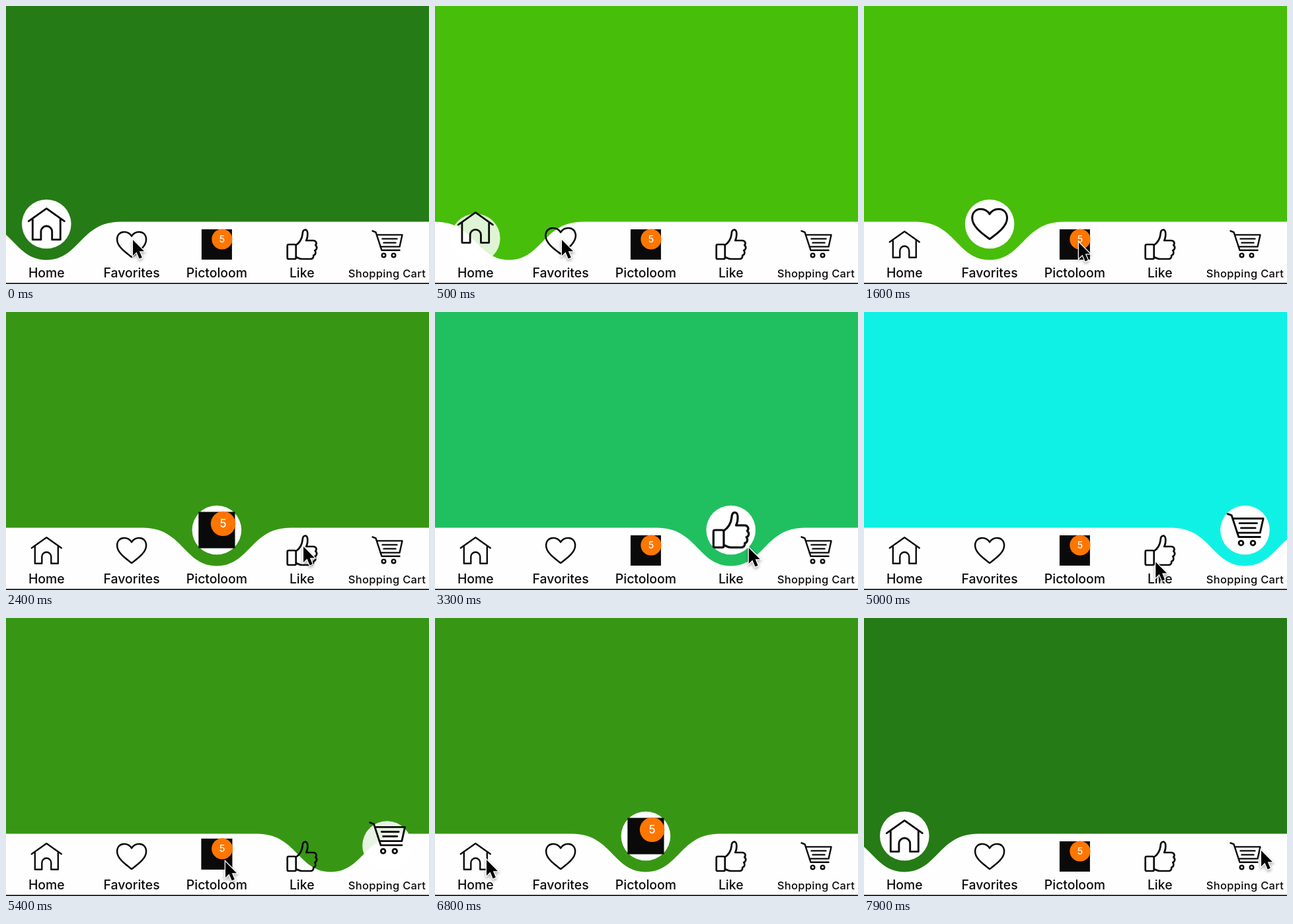
These frames come from a looping animation (640 by 422 pixels, 8000 ms). An HTML page with a canvas:

```html
<!DOCTYPE html>
<html lang="en">
<head>
<meta charset="utf-8">
<title>Curved tab bar</title>
<style>
html, body { margin: 0; width: 100%; height: 100%; overflow: hidden; }
canvas { display: block; width: 640px; height: 422px; }
</style>
</head>
<body>
<canvas id="stage"></canvas>
<script>
const W = 640, H = 422, LOOP = 8000;
const BAR_Y = 327.5, DENT_Y = 385.4, REST_Y = 362, RAISED_Y = 331, INK = '#0a0a0a';
const canvas = document.getElementById('stage');
const ctx = canvas.getContext('2d');
const ratio = window.devicePixelRatio || 1;
canvas.width = W * ratio;
canvas.height = H * ratio;

const tabs = [
  { label: 'Home', color: '#257b15', icon: drawHome },
  { label: 'Favorites', color: '#47be09', icon: drawHeart },
  { label: 'Pictoloom', color: '#379714', icon: drawPictures },
  { label: 'Like', color: '#20c060', icon: drawThumb },
  { label: 'Shopping Cart', color: '#10f1e6', icon: drawCart, size: 16.5, spacing: '0.3px' }
];
tabs.forEach((tab, i) => tab.x = 61.3 + 128.8 * i);

// [time, tab index]
const clicks = [[-1000, 0], [400, 1], [1630, 2], [2860, 3], [4086, 4], [5318, 2], [6840, 0]];

// [time, x, y] of the pointer tip
const pointer = [
  [0, 192, 355], [500, 192, 355], [950, 240, 369], [1500, 325, 359], [1750, 325, 359],
  [2400, 450, 356], [2700, 474, 358], [3250, 474, 358], [4050, 575, 354], [4350, 575, 354],
  [4900, 460, 381], [5280, 332, 370], [5600, 332, 370], [6300, 140, 371], [6700, 78, 367],
  [6850, 78, 367], [7250, 40, 366], [7880, 601, 353], [LOOP, 601, 353]
];

const arrow = new Path2D('M0 0V24L5.5 18.5L9.7 28.5L13.8 26.7L9.8 17.2H17Z');
const heart = new Path2D('M0 19C-7 13.5-22 4-22-7.5C-22-15-17-19-11.5-19C-6-19-2-16 0-12.5' +
  'C2-16 6-19 11.5-19C17-19 22-15 22-7.5C22 4 7 13.5 0 19Z');
const house = new Path2D('M-22.5-3.7L0-19.7L22.5-3.7M-17.5-6V19.7H-7V9.5A7 7 0 0 1 7 9.5V19.7H17.5V-6');
const thumb = new Path2D('M-9 1C-3-3 0-8 1-16C1-24 8-24 8.5-18C9-13 8-9 6.5-6H17C22-6 23-1 20.5 1' +
  'C24 4 22.5 8 19.5 9C22 12 20.5 16 17.5 16.5C18 20 16 22 13 22H0C-4 22-6 20-9 19' +
  'M-20 0H-11Q-9 0-9 2V20Q-9 22-11 22H-20Q-22 22-22 20V2Q-22 0-20 0Z');
const cart = new Path2D('M-22-20.5L-17-18.7L-8 8.8H19M-15.5-14.6H23L19 3.4H-10M-7-8.6H15M-5-2.6H13');

function bezier(x1, y1, x2, y2) {
  const at = (u, a, b) => 3 * u * (1 - u) ** 2 * a + 3 * u * u * (1 - u) * b + u ** 3;
  return t => {
    if (t <= 0) return 0;
    if (t >= 1) return 1;
    let lo = 0, hi = 1;
    for (let i = 0; i < 24; i++) {
      const mid = (lo + hi) / 2;
      if (at(mid, x1, x2) < t) lo = mid; else hi = mid;
    }
    return at(lo, y1, y2);
  };
}
const easeOut = bezier(0, 0, .58, 1);
const easeInOut = bezier(.42, 0, .58, 1);
const mix = (a, b, p) => a + (b - a) * p;

function stroke(path, width) {
  ctx.strokeStyle = INK;
  ctx.lineWidth = width;
  ctx.lineCap = ctx.lineJoin = 'round';
  ctx.stroke(path);
}

function disc(x, y, r, color) {
  ctx.fillStyle = color;
  ctx.beginPath();
  ctx.arc(x, y, r, 0, Math.PI * 2);
  ctx.fill();
}

function text(str, x, y, size, color, spacing = '0px') {
  ctx.font = `450 ${size}px Inter, Roboto, sans-serif`;
  ctx.letterSpacing = spacing;
  ctx.textAlign = 'center';
  ctx.fillStyle = color;
  ctx.fillText(str, x, y);
}

function drawHome() { stroke(house, 2.4); }
function drawHeart() { stroke(heart, 2.5); }
function drawThumb() { stroke(thumb, 2.7); }

function drawPictures() {
  ctx.fillStyle = INK;
  ctx.fillRect(-23, -23, 46, 46);
  disc(8, -8, 15.6, '#ff7600');
  text('5', 8, -3.1, 14, '#fff');
}

function drawCart() {
  stroke(cart, 2.4);
  for (const x of [-5, 10]) {
    const wheel = new Path2D();
    wheel.arc(x, 16.4, 2.8, 0, Math.PI * 2);
    stroke(wheel, 2.4);
  }
}

function drawBar(x) {
  ctx.fillStyle = '#fffefe';
  ctx.beginPath();
  ctx.moveTo(-200, BAR_Y);
  ctx.lineTo(x - 112, BAR_Y);
  ctx.bezierCurveTo(x - 51, BAR_Y, x - 50, DENT_Y, x, DENT_Y);
  ctx.bezierCurveTo(x + 50, DENT_Y, x + 51, BAR_Y, x + 112, BAR_Y);
  ctx.lineTo(W + 200, BAR_Y);
  ctx.lineTo(W + 200, H);
  ctx.lineTo(-200, H);
  ctx.fill();
}

function drawPointer(t) {
  const i = pointer.findIndex(key => key[0] > t);
  const [t0, x0, y0] = pointer[i - 1], [t1, x1, y1] = pointer[i];
  const p = easeInOut((t - t0) / (t1 - t0));
  ctx.save();
  ctx.translate(mix(x0, x1, p), mix(y0, y1, p));
  ctx.lineJoin = 'miter';
  ctx.lineWidth = 2.6;
  ctx.strokeStyle = '#fff';
  ctx.shadowColor = 'rgba(0,0,0,.4)';
  ctx.shadowBlur = 4 * ratio;
  ctx.shadowOffsetY = 2 * ratio;
  ctx.stroke(arrow);
  ctx.shadowColor = 'transparent';
  ctx.fillStyle = '#000';
  ctx.fill(arrow);
  ctx.restore();
}

function draw(t) {
  const n = clicks.filter(c => c[0] <= t).length - 1;
  const [start, current] = clicks[n];
  const previous = n ? clicks[n - 1][1] : current;
  const rise = easeInOut((t - start) / 350);
  const lift = i => i === current ? rise : i === previous ? 1 - rise : 0;

  ctx.setTransform(ratio, 0, 0, ratio, 0, 0);
  ctx.fillStyle = tabs[current].color;
  ctx.fillRect(0, 0, W, H);
  drawBar(mix(tabs[previous].x, tabs[current].x, easeOut((t - start) / 385)));

  tabs.forEach((tab, i) => {
    const p = lift(i);
    ctx.globalAlpha = p;
    disc(tab.x, RAISED_Y + 125 * (1 - p), 37.3, '#fff');
    ctx.globalAlpha = 1;
  });
  tabs.forEach((tab, i) => {
    const p = lift(i), scale = 1 + .2 * p;
    ctx.save();
    ctx.translate(tab.x, mix(REST_Y, RAISED_Y, p));
    ctx.scale(scale, scale);
    tab.icon();
    ctx.restore();
    text(tab.label, tab.x, 412, tab.size || 19.4, INK, tab.spacing);
  });

  ctx.fillStyle = '#111';
  ctx.fillRect(0, 420.3, W, 1.7);
  drawPointer(t);
}

function tick() {
  draw(performance.now() % LOOP);
  requestAnimationFrame(tick);
}
tick();
</script>
</body>
</html>
```
